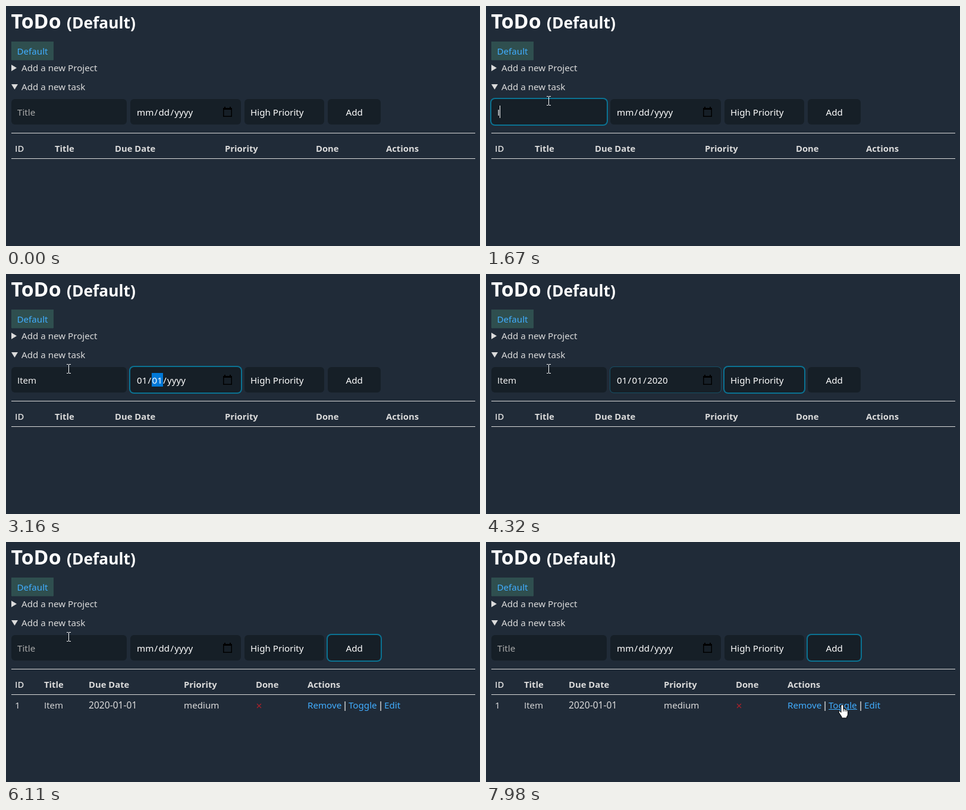
Write an HTML page with a canvas that moves like this. It is 797x405 px and loops after 8 s.

```html
<!DOCTYPE html>
<html lang="en">
<head>
<meta charset="utf-8">
<title>ToDo</title>
<style>
  html, body { margin: 0; width: 100%; height: 100%; overflow: hidden; background: #202b38; }
  canvas { display: block; }
</style>
</head>
<body>
<canvas id="stage" width="797" height="405"></canvas>
<script>
const ctx = document.getElementById('stage').getContext('2d');
const LOOP = 8000;
const TEXT = '#dbdbdb', LINK = '#41adff', FIELD = '#161f27';

// Form controls: left edge, width and the time each one receives focus.
const fields = [
  { x: 9, w: 194, focus: 790 },
  { x: 209, w: 186, focus: 2370 },
  { x: 401, w: 134, focus: 4320 },
  { x: 541, w: 89, focus: 5580 }
];
const SUBMIT = 6110, RING_FADE = 90;

const arrow = new Path2D('M0 0V16L3.7 12.5 6.2 18.3 8.6 17.2 6.1 11.6H11.3Z');
const hand = new Path2D('M-2 1.5Q-2-.5 0-.5T2 1.5V7Q4 5.6 5 7.6 7 6.6 7.6 8.5 9.5 8 9.5 10.5V15Q9.5 18 7.6 20V22H-1V20L-5.5 13Q-6.8 10.5-5 10-3.6 10-2 12.5Z');

// Noto Sans has the plain g, Open Sans the capital I without serifs.
function setFont(str, size = 15.15, weight = 400) {
  const family = str.includes('I') ? 'Open Sans' : 'Noto Sans';
  ctx.font = `${weight} ${size}px "${family}", sans-serif`;
}

function text(str, x, y, color = TEXT, size, weight) {
  setFont(str, size, weight);
  ctx.fillStyle = color;
  ctx.fillText(str, x, y);
}

function textWidth(str) {
  setFont(str);
  return ctx.measureText(str).width;
}

function rect(x, y, w, h, color) {
  ctx.fillStyle = color;
  ctx.fillRect(x, y, w, h);
}

function rounded(x, y, w, h, r, color) {
  ctx.fillStyle = color;
  ctx.beginPath();
  ctx.roundRect(x, y, w, h, r);
  ctx.fill();
}

function polygon(color, ...points) {
  ctx.fillStyle = color;
  ctx.beginPath();
  points.forEach(([x, y]) => ctx.lineTo(x, y));
  ctx.fill();
}

// Value of the last [time, value] step that has been reached.
const stepAt = (t, steps) => steps.reduce((value, [at, next]) => t >= at ? next : value, undefined);

function bezier(points, s) {
  while (points.length > 1) {
    points = points.slice(1).map((p, i) => p.map((v, k) => points[i][k] + (v - points[i][k]) * s));
  }
  return points[0];
}

const ease = s => s * s * (3 - 2 * s);

// The pointer is sampled about every 77 ms.
function pointerAt(t) {
  if (t < 210) return null;
  if (t < 6980) {
    const s = Math.min(1, Math.floor((t - 210) / 77) / 8);
    return bezier([[294, 308], [130, 125], [105, 160]], ease(s));
  }
  if (t < 7820) {
    const s = Math.min(1, (Math.floor((t - 6980) / 77) + 1) / 11);
    return bezier([[105, 160], [-70, 310], [280, 390], [557, 280]], ease(s));
  }
  return stepAt(t, [[7820, [571, 280]], [7900, [588, 278]], [7980, [599, 275]]]);
}

function drawHeader() {
  text('ToDo', 8.5, 38, '#fff', 33.8, 600);
  text('(Default)', 102, 38, '#fff', 26.4, 600);
  rect(9, 60, 71, 32, '#2f4f4f');
  for (let x = 9; x < 80; x += 2) rect(x, 91, 1, 1, '#202b38');
  text('Default', 18.5, 82, LINK);
  polygon(TEXT, [9, 99], [18, 104.5], [9, 110]);
  text('Add a new Project', 26, 110);
  polygon(TEXT, [9, 132], [20, 132], [14.5, 141]);
  text('Add a new task', 26, 142);
}

function drawFields(t) {
  const active = fields.filter(f => t >= f.focus).length - 1;
  fields.forEach((f, i) => {
    const fading = i === active - 1 && t < fields[active].focus + RING_FADE;
    const spread = i === active ? 2 : fading ? 1 : 0;
    if (spread) {
      rounded(f.x - spread, 157 - spread, f.w + 2 * spread, 43 + 2 * spread, 6 + spread,
        spread === 2 ? '#0b7292' : '#164f65');
    }
    rounded(f.x, 157, f.w, 43, 6, FIELD);
  });
}

function drawTitle(t) {
  const typed = t < SUBMIT ? stepAt(t, [[0, ''], [1670, 'I'], [1750, 'It'], [1830, 'Ite'], [1900, 'Item']]) : '';
  text(typed || 'Title', 19, 185, typed ? '#fff' : '#a9a9a9');
  const caret = (t >= 790 && t < 1290) || (t >= 1670 && t < 2370);
  if (caret) rect(Math.round(19 + textWidth(typed)), 168, 1, 21, '#fff');
}

function drawDate(t) {
  const filled = t < SUBMIT;
  const parts = [
    filled && t >= 2920 ? '01' : 'mm',
    filled && t >= 3160 ? '01' : 'dd',
    filled && t >= 3560 ? '2020' : 'yyyy'
  ];
  const selected = stepAt(t, [[0, -1], [2370, 0], [3070, 1], [3330, 2], [4320, -1]]);
  let x = 219;
  parts.forEach((part, i) => {
    const width = textWidth(part) + 2;
    if (i === selected) rect(Math.round(x), 167, Math.round(width), 23, '#0078d7');
    text(part, x + 1, 185, '#fff');
    x += width;
    if (i < 2) text('/', x + .3, 185, '#fff');
    x += 6.2;
  });
  ctx.strokeStyle = '#000';
  ctx.lineWidth = 1.5;
  ctx.strokeRect(365.75, 172.75, 13.5, 13.5);
  rect(365, 172, 15, 3, '#000');
  rect(367, 170, 2, 3, '#000');
  rect(376, 170, 2, 3, '#000');
}

function drawForm(t) {
  drawFields(t);
  drawTitle(t);
  drawDate(t);
  const level = stepAt(t, [[0, 'High'], [4640, 'Medium'], [4810, 'Low'], [5270, 'Medium'], [SUBMIT, 'High']]);
  text(level + ' Priority', 411, 185, '#fff');
  text('Add', 571.5, 185, '#fff');
}

function drawLink(label, x, width, pointer) {
  text(label, x, 281, LINK);
  const [px, py] = pointer || [0, 0];
  if (px >= x && px <= x + width && py > 265 && py < 287) rect(x, 282, width, 1, LINK);
}

function drawTable(t, pointer) {
  const hasRow = t >= SUBMIT;
  const columns = hasRow ? [15, 64, 139, 299, 420, 507] : [15, 82, 183, 368, 521, 639];
  rect(9, 214, 780, 1, TEXT);
  rect(9, 257, 780, 1, TEXT);
  ['ID', 'Title', 'Due Date', 'Priority', 'Done', 'Actions']
    .forEach((name, i) => text(name, columns[i], 246, TEXT, 14.8, 600));
  if (!hasRow) return;

  text('1', 15, 281);
  text('Item', 64, 281);
  text('2020-01-01', 139, 281, TEXT, 15.6);
  text('medium', 299, 281);
  ctx.strokeStyle = '#b0202a';
  ctx.lineWidth = 1.1;
  ctx.stroke(new Path2D('M422 273l7 7m0-7l-7 7'));
  drawLink('Remove', 507, 57, pointer);
  drawLink('Toggle', 576, 48, pointer);
  drawLink('Edit', 636, 27, pointer);
  rect(569.4, 269, 1.4, 16, TEXT);
  rect(629.4, 269, 1.4, 16, TEXT);
}

function drawPointer(t, [x, y]) {
  ctx.save();
  ctx.translate(Math.round(x), Math.round(y));
  if (y < 205) {
    ctx.strokeStyle = '#fff';
    ctx.lineWidth = 1;
    ctx.stroke(new Path2D('M-3-7.5H0M1-7.5H4M.5-7V7M-3 7.5H0M1 7.5H4'));
  } else {
    const shape = t >= 7740 ? hand : arrow;
    ctx.fillStyle = '#fff';
    ctx.strokeStyle = '#000';
    ctx.lineWidth = 1;
    ctx.fill(shape);
    ctx.stroke(shape);
    if (shape === hand) ctx.stroke(new Path2D('M2 7V11M5 8V11M7.6 9V11'));
  }
  ctx.restore();
}

function draw(now) {
  const t = now % LOOP;
  const pointer = pointerAt(t);
  rect(0, 0, 797, 405, '#202b38');
  drawHeader();
  drawForm(t);
  drawTable(t, pointer);
  if (pointer) drawPointer(t, pointer);
  requestAnimationFrame(draw);
}
requestAnimationFrame(draw);
</script>
</body>
</html>
```
